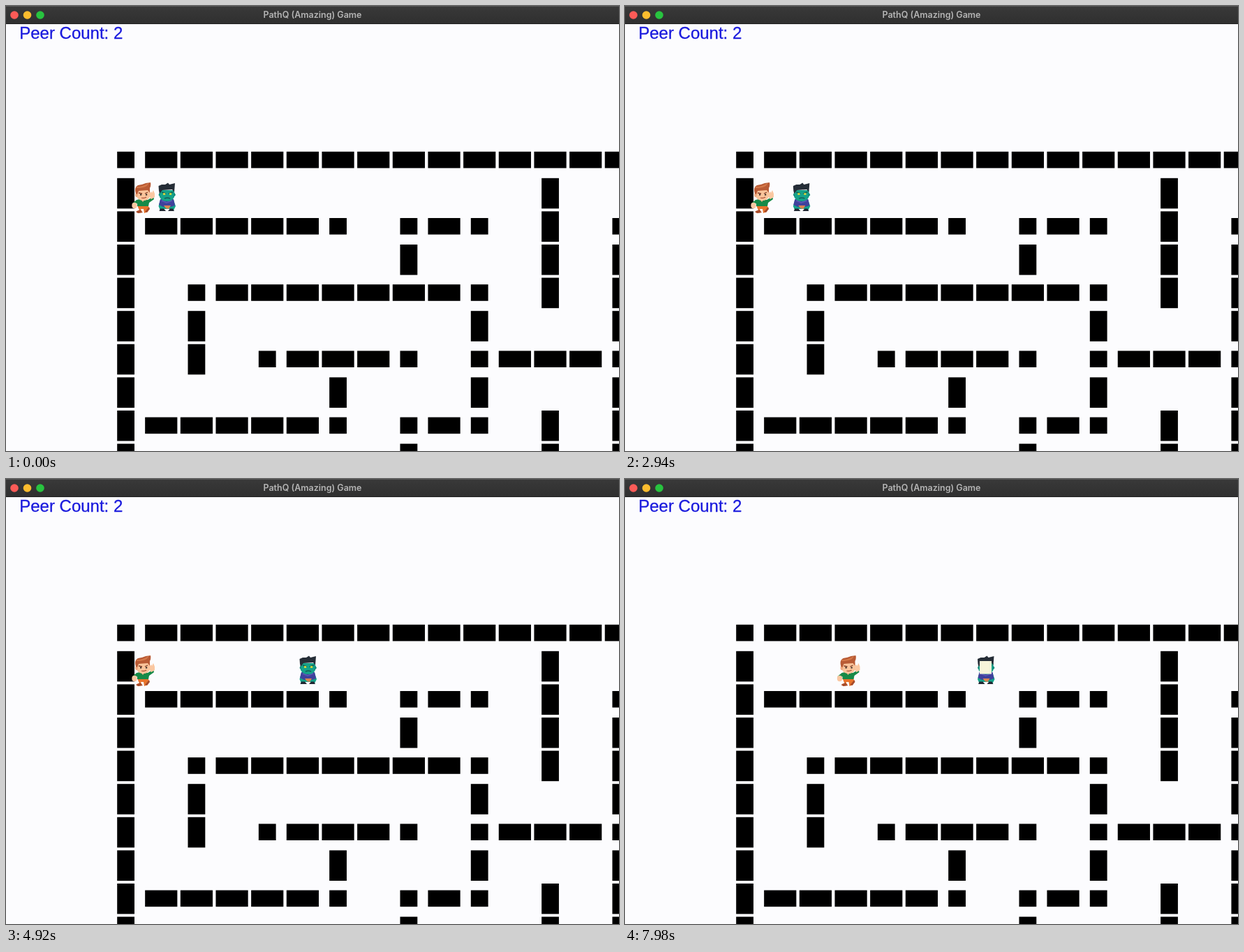
An HTML page that plays this animation: 878 by 638 pixels, repeating every 8000 ms.

```html
<!DOCTYPE html>
<html lang="en">
<head>
<meta charset="utf-8">
<title>Maze game</title>
<style>
  html, body { margin: 0; width: 100%; height: 100%; overflow: hidden; background: #fcfcfe; }
  svg { display: block; width: 878px; height: 638px; }
  .title { font: 600 12.5px Inter, "Open Sans", sans-serif; fill: #b5b5b5; text-anchor: middle; }
  .peers { font: 24px "Liberation Sans", Arial, sans-serif; fill: #1a1add; stroke: #1a1add; stroke-width: .3; }
</style>
</head>
<body>
<svg viewBox="0 0 878 638">
  <defs>
    <linearGradient id="bar" x2="0" y2="1">
      <stop offset="0" stop-color="#393939"/>
      <stop offset="1" stop-color="#2f2f2f"/>
    </linearGradient>
  </defs>
  <rect width="878" height="638" fill="#fcfcfe"/>
  <g id="maze"></g>

  <g id="hero">
    <path d="M188 286L203 284 205 290 203 295 198 297 197 291 193 291 195 296 189 297 187 294 191 293Z" fill="#e8742c"/>
    <path d="M186 295L192 292 196 296 189 297ZM199 295L205 288 206 291 202 296Z" fill="#a74b2a"/>
    <path d="M187 278Q196 275 203 278L211 273 212 277 205 282 204 287 188 287 188 283 183 286 181 283Z" fill="#178a48"/>
    <path d="M193 277H199L196 281Z" fill="#f4b98e"/>
    <ellipse cx="184" cy="286" rx="3.7" ry="4.2" fill="#fac7a1"/>
    <path d="M205 269L208 266 209 268 211 264 213 269 213 274 208 277 205 273Z" fill="#fac7a1"/>
    <path d="M187 264Q196 260 206 264L206 273Q204 279 196 279 188 278 187 272Z" fill="#fac49b"/>
    <ellipse cx="187" cy="271" rx="2" ry="3" fill="#f2aa80"/>
    <path d="M186 269Q183 260 189 257 196 256 200 254L207 253Q208 258 206 261L206 268 203 264 190 265 188 270Z" fill="#b95b35"/>
    <path d="M187 259Q195 260 204 254 203 261 187 261Z" fill="#d57949"/>
    <path d="M190 268L195 269M199 269L203 267" stroke="#833e28" stroke-width="1.3"/>
    <path d="M192 270.5h2.2M200 270.5h2.2" stroke="#302622" stroke-width="2"/>
    <path d="M194 275Q198 276 201 274" fill="none" stroke="#a94a32" stroke-width="1.2"/>
  </g>

  <g id="goblin">
    <path d="M221 278L218.5 287 221 293 226 291 235 291 240 293 243 287 240 278Z" fill="#16a28a"/>
    <path d="M221 277H240L242 286 236 288 225 288 219 285Z" fill="#40419c"/>
    <path d="M223 279L230 282 238 279" fill="none" stroke="#5c58b7" stroke-width="1.5"/>
    <path d="M226 286H236L233 291 229 290Z" fill="#d98552"/>
    <path d="M219.5 294L221 290.5H226L229 294ZM232 294L235 290.5H239L241 294Z" fill="#202631"/>
    <path d="M220 264H241L241 274Q238 280 231 280 223 280 220 274Z" fill="#16a28a"/>
    <path d="M220 267L218.5 271 221 274ZM241 267L243 271 240 274Z" fill="#0b8776"/>
    <path d="M219 265L218.5 258 223 256 228 256 232 253.5 234 256 242 254 241 267 238 263 224 264 220 269Z" fill="#252d37"/>
    <path d="M223 267L229 269M233 269L239 267" stroke="#155b51" stroke-width="1.5"/>
    <path d="M225 269.5h3.2M234 269.5h3.2" stroke="#e7de39" stroke-width="2.4"/>
    <path d="M227 276Q231 274 235 276" fill="none" stroke="#155d57" stroke-width="1.5"/>
    <rect id="mask" x="221.5" y="261" width="17" height="18.5" fill="#f7f4d9"/>
  </g>

  <rect width="878" height="26" fill="url(#bar)"/>
  <path d="M0 .5H878" stroke="#555"/>
  <path d="M0 25.5H878" stroke="#222"/>
  <circle cx="12" cy="13" r="5.8" fill="#fc5b57"/>
  <circle cx="30.5" cy="13" r="5.8" fill="#fcbc2e"/>
  <circle cx="49" cy="13" r="5.8" fill="#28c33f"/>
  <text class="title" x="439" y="17">PathQ (Amazing) Game</text>
  <text class="peers" x="19.2" y="47">Peer Count: 2</text>
</svg>
<script>
const LOOP = 8000, CELL_W = 50.66, CELL_H = 47.6;
const byId = id => document.getElementById(id);

// c: corner, h: horizontal wall, v: vertical wall
const rows = [
  'chhhhhhhhhhhhhh',
  'v...........v..',
  'vhhhhhc.chc.v.c',
  'v.......v...v.v',
  'v.chhhhhhhc.v.v',
  'v.v.......v...v',
  'v.v.chhhc.chhhc',
  'v.....v...v...v',
  'vhhhhhc.chc.v.v',
  'v.......v...v.v'
];
const tiles = {
  c: [159.2, 208.8, 24.8, 23.6],
  h: [148.5, 208.8, 46.2, 23.6],
  v: [159.2, 199.2, 24.8, 43.6]
};
byId('maze').innerHTML = rows.map((row, j) => [...row].map((kind, i) => {
  if (kind === '.') return '';
  const [x, y, w, h] = tiles[kind];
  return `<rect x="${x + i * CELL_W}" y="${y + j * CELL_H}" width="${w}" height="${h}"/>`;
}).join('')).join('');

// Screen updates come in bursts: start, end, number of updates
const bursts = [
  [20, 820, 17], [840, 1560, 17], [1660, 2400, 18], [2500, 3240, 18], [3340, 4080, 18],
  [4180, 4920, 18], [5020, 5760, 18], [5860, 6600, 18], [6700, 7440, 17], [7560, 7980, 10]
];
// Walks: time, distance
const goblinWalk = [[2690, 0], [3514, 75], [4180, 132], [4920, 202], [5840, 286.5]];
const heroWalk = [[5640, 0], [6121, 44], [7440, 96.5], [7980, 123.5]];
const MASK_AT = 6700;

function updateTime(t) {
  const burst = bursts.filter(b => b[0] <= t).pop();
  if (!burst) return 0;
  const [start, end, count] = burst;
  const step = (end - start) / (count - 1);
  return Math.min(end, start + Math.floor((t - start) / step + 1e-6) * step);
}

function distance(walk, t) {
  if (t <= walk[0][0]) return walk[0][1];
  const next = walk.findIndex(p => p[0] > t);
  if (next < 0) return walk[walk.length - 1][1];
  const [t0, d0] = walk[next - 1], [t1, d1] = walk[next];
  return d0 + (d1 - d0) * (t - t0) / (t1 - t0);
}

function draw(now) {
  const t = updateTime(now % LOOP);
  byId('hero').setAttribute('transform', `translate(${distance(heroWalk, t)} 0)`);
  byId('goblin').setAttribute('transform', `translate(${distance(goblinWalk, t)} 0)`);
  byId('mask').setAttribute('visibility', t >= MASK_AT ? 'visible' : 'hidden');
}

const begin = performance.now();
function tick() {
  draw(performance.now() - begin);
  requestAnimationFrame(tick);
}
tick();
</script>
</body>
</html>
```
